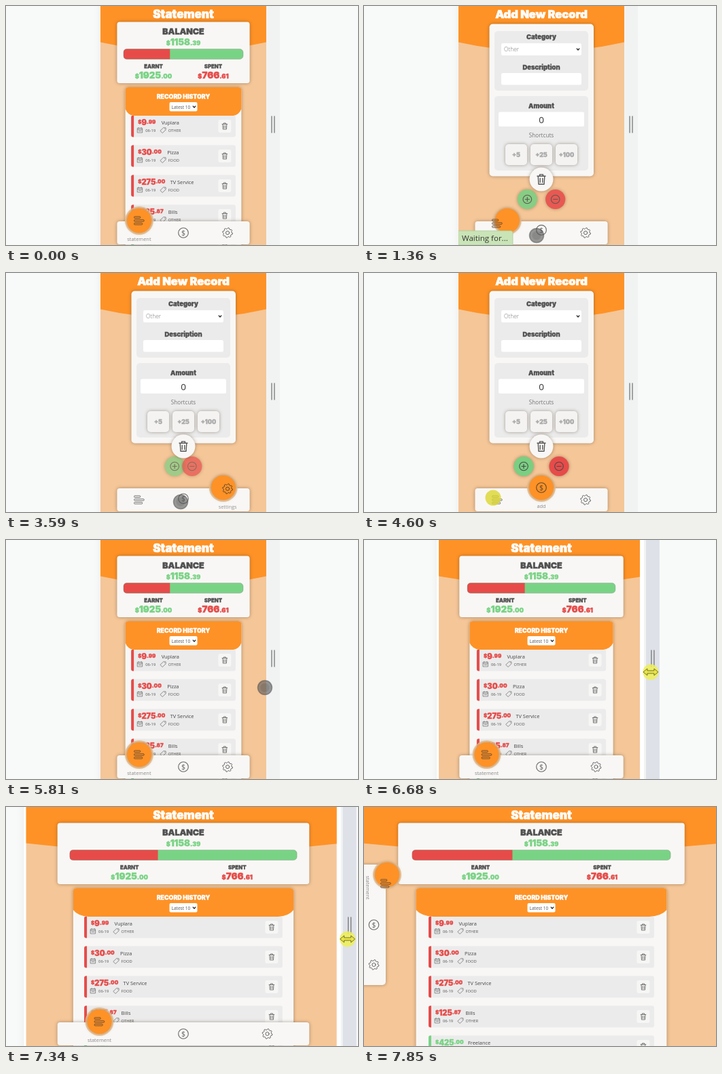
Write an HTML page that moves like this. It is 518 px wide and 353 px high and loops after 8000 ms.

```html
<!DOCTYPE html>
<html lang="en">
<head>
<meta charset="utf-8">
<title>Budget app</title>
<style>
  html, body { margin: 0; width: 100%; height: 100%; overflow: hidden; background: #f8faf9; }
  svg { display: block; width: 518px; height: 353px; }
  text { font-family: "Open Sans", "Noto Sans", sans-serif; text-anchor: middle; white-space: pre; }
  .h { font-family: Inter, Roboto, sans-serif; font-weight: 900; stroke-width: .04em; }
  .l { font-weight: 300; }
  .s { text-anchor: start; }
  .up { filter: drop-shadow(0 .5px 2.5px rgba(60, 40, 20, .42)); }
  .frame { filter: drop-shadow(0 0 6px rgba(0, 0, 0, .06)); }
  .line { fill: none; stroke-linecap: round; stroke-linejoin: round; }
</style>
</head>
<body>
<svg id="stage" viewBox="0 0 518 353"></svg>
<script>
const LOOP = 8000, START = 840, STEP = 171, MID = 261;
const ORANGE = '#fe9226', PEACH = '#f4c698', CARD = '#f8f7f5', PANEL = '#ebebeb';
const RED = '#e64b49', GREEN = '#79d385', DARK = '#505050';
const stage = document.getElementById('stage');

const clamp = v => Math.max(0, Math.min(1, v));
const mix = (a, b, p) => a + (b - a) * p;
const smooth = p => (p = clamp(p)) * p * (3 - 2 * p);

// Shape helpers
const rect = (x, y, w, h, fill, r = 0, more = '') =>
  `<rect x="${x}" y="${y}" width="${w}" height="${h}" rx="${r}" fill="${fill}" ${more}/>`;
const disc = (x, y, r, fill, more = '') =>
  `<circle cx="${x}" cy="${y}" r="${r}" fill="${fill}" ${more}/>`;
const shape = (d, fill) => `<path d="${d}" fill="${fill}"/>`;
const line = (d, color, w = 1) => `<path class="line" d="${d}" stroke="${color}" stroke-width="${w}"/>`;
const at = (x, y, body, k = 1) => `<g transform="translate(${x} ${y}) scale(${k})">${body}</g>`;
const text = (x, y, s, size, fill, cls = '') =>
  `<text x="${x}" y="${y}" font-size="${size}" fill="${fill}" class="${cls}">${s}</text>`;
const head = (x, y, s, size, fill) =>
  `<text class="h" x="${x}" y="${y}" font-size="${size}" fill="${fill}" stroke="${fill}">${s}</text>`;
const UP = 'class="up"';

function money(x, y, value, big, small, fill, cls = '', lift = 0) {
  const [whole, cents] = value.split('.');
  return `<text class="h ${cls}" x="${x}" y="${y}" font-size="${small}" fill="${fill}" stroke="${fill}">` +
    `<tspan dy="${-lift}">$</tspan><tspan dy="${lift}" font-size="${big}">${whole}</tspan>` +
    `<tspan dy="${-lift}">.${cents}</tspan></text>`;
}

// Icons, drawn around 0,0
const trash = c => line('M-4-3.2H4M-1.6-3.2V-4.8H1.6V-3.2M-3.2-3.2L-2.7 4.8H2.7L3.2-3.2M-1.2-1V3M1.2-1V3', c, .9);
const calendar = c => line('M-3.5-3H3.5V3.5H-3.5ZM-3.5-1H3.5M-2-4V-2.6M2-4V-2.6M-1.8 1H1.8', c, .8);
const tag = c => line('M-4 .6L.6-3.8L4-3.6L4-.6L-.6 3.8ZM2.2-2.2h.1', c, .8);
const camera = c => line('M-6-3H-3L-2-4.8H2L3-3H6V4.5H-6Z', c, 1) +
  `<circle class="line" cy=".6" r="2.4" stroke="${c}"/>`;
const exit = c => line('M1.5-2V-4.5H-4.5V4.5H1.5V2M-1 0H6M4-2L6 0L4 2', c, 1);
const chevron = (x, y) => line(`M${x - 1.8} ${y - 1}L${x} ${y + 1}L${x + 1.8} ${y - 1}`, '#222', 1.2);
const ring = (sign, c) => disc(0, 0, 6.3, 'none', `stroke="${c}" stroke-width="1.1"`) +
  line(sign === '+' ? 'M-3 0H3M0-3V3' : 'M-3 0H3', c, 1.2);

const bars = c => [[-4.8, 9], [0, 14.5], [4.8, 12]].map(([y, w]) =>
  rect(-7.3, y - 1.2, w, 2.4, 'none', .7, `stroke="${c}" stroke-width=".9"`)).join('');
const dollar = c => disc(0, 0, 7.3, 'none', `stroke="${c}" stroke-width="1.1"`) + text(0, 3.8, '$', 10.5, c);
function gear(c) {
  const pts = [];
  for (let i = 0; i < 32; i++) {
    const a = (i + .5) / 32 * Math.PI * 2, r = i % 4 < 2 ? 7.4 : 5.9;
    pts.push((r * Math.cos(a)).toFixed(2) + ' ' + (r * Math.sin(a)).toFixed(2));
  }
  return line(`M${pts.join('L')}Z`, c) + `<circle class="line" r="2.6" stroke="${c}"/>`;
}

const TABS = [['statement', bars], ['add', dollar], ['settings', gear]];
const RECORDS = [
  ['9.99', 'Vuplara', 'OTHER', 44.5], ['30.00', 'Pizza', 'FOOD', 53],
  ['275.00', 'TV Service', 'FOOD', 57.5], ['125.87', 'Bills', 'OTHER', 54.5],
  ['425.00', 'Freelance', 'OTHER', 58, GREEN]
];

function record([sum, name, kind, gap, color = RED], i, left, width) {
  const y = 161.5 + 44 * i, right = left + width;
  return rect(left, y, width, 32, PANEL, 3) +
    shape(`M${left + 4} ${y}h-1.5q-2.5 0-2.5 3v26q0 3 2.5 3h1.5z`, color) +
    money(left + 10, y + 14.3, sum, 11.2, 7.9, color, 's', 1.5) +
    text(left + gap, y + 13.5, name, 7.4, '#444', 's') +
    at(left + 13, y + 22, calendar('#777')) + text(left + 21, y + 24.5, '06-19', 5.8, '#555', 's') +
    at(left + 47, y + 22, tag('#777')) + text(left + 54.5, y + 24.5, kind, 5.8, '#555', 's') +
    rect(right - 25.5, y + 6.5, 19, 19, '#f6f6f5', 3) + at(right - 16, y + 16, trash('#666'), .95);
}

function statement(w) {
  const card = w * .8, bar = card * .902, log = w * .7, row = log * .9;
  const side = 44 + (w - 244) * .161, x = MID - log / 2, x2 = MID + log / 2, c = log * .07;
  return head(MID, 18, 'Statement', 17, '#fff') +
    rect(MID - card / 2, 23.5, card, 90.5, CARD, 4, UP) +
    head(MID, 42, 'BALANCE', 12.4, DARK) + money(MID, 58, '1158.39', 13.2, 9, GREEN) +
    rect(MID - bar / 2, 63.5, bar, 15, GREEN, 5) +
    shape(`M${MID - bar * .112} 63.5V78.5H${MID - bar / 2 + 5}q-5 0-5-5v-5q0-5 5-5z`, RED) +
    rect(MID - bar / 2, 63.5, bar, 15, 'none', 5, 'stroke="#777" stroke-width=".5" stroke-opacity=".6"') +
    head(MID - side, 92, 'EARNT', 7.8, DARK) + money(MID - side, 107, '1925.00', 13.4, 9.2, GREEN) +
    head(MID + side, 92, 'SPENT', 7.8, DARK) + money(MID + side, 107, '766.61', 13.4, 9.2, RED) +
    rect(x, 120, log, 260, CARD, 5, UP) +
    RECORDS.map((r, i) => record(r, i, MID - row / 2, row)).join('') +
    shape(`M${x} 125q0-5 5-5H${x2 - 5}q5 0 5 5V152Q${x2 - c * .3} 161 ${x2 - c} 162H${x + c}Q${x + c * .3} 161 ${x} 152z`, ORANGE) +
    head(MID, 136.7, 'RECORD HISTORY', 8.8, '#fff') +
    rect(240.5, 142, 41, 13.5, '#fff', 2) + text(243.5, 151.6, 'Latest 10', 6.6, '#555', 's') + chevron(277, 149);
}

function add(open) {
  const field = (x, y, w, h) => rect(x, y, w, h, '#fff', 2.5);
  const round = (x, fill, sign) =>
    `<g opacity="${.4 + .6 * open}">${disc(x, 285.5, 14.6, fill, UP)}${at(x, 285.5, ring(sign, '#4a4a4a'))}</g>`;
  return head(MID, 18, 'Add New Record', 16.5, '#fff') +
    rect(184.5, 26.5, 153.5, 225, CARD, 5, UP) +
    rect(192, 37, 138, 88, PANEL, 5) + rect(192, 133, 138, 110, PANEL, 5) +
    head(MID, 49, 'Category', 9.4, DARK) + field(202, 55, 118, 18) +
    text(206, 67, 'Other', 8.4, '#777', 'l s') + chevron(315, 64) +
    head(MID, 94, 'Description', 9.4, DARK) + field(202, 99, 118, 17.5) +
    head(MID, 151, 'Amount', 9.3, DARK) + field(198, 156.5, 126, 21.5) +
    text(MID, 173, '0', 13.5, '#333') + text(MID, 193.5, 'Shortcuts', 8.2, '#777') +
    ['+5', '+25', '+100'].map((s, i) => rect(208 + 37 * i, 204, 32, 31, '#f4f3f2', 5, UP) +
      head(224 + 37 * i, 223, s, 8.8, '#aaa')).join('') +
    round(MID - 26 * open, '#79cf82', '+') + round(MID + 26 * open, RED, '-') +
    disc(MID, 256, 17.5, CARD, UP) + at(MID, 256, trash('#555'), 1.5);
}

function avatar() {
  return `<clipPath id="face"><circle cx="261" cy="63" r="28"/></clipPath><g clip-path="url(#face)">` +
    rect(233, 35, 56, 56, '#e8e3cc') +
    line('M241 52V41L272 37L277 47', '#3c4a4e', 1.5) +
    shape('M241 53L253 48L279 47L281 68L252 74L242 68z', '#3d7c98') +
    shape('M241 53L253 48L279 47L254 52z', '#9cc4cf') + shape('M241 53L254 52V74L242 68z', '#27536a') +
    rect(256, 54, 9, 10, '#d8dccb', 1) + rect(268, 53, 8, 10, '#d8dccb', 1) +
    disc(260.5, 60, 2.2, '#c9503c') + disc(272, 59, 2.2, '#c9503c') +
    shape('M246 75L283 70V92H246z', '#5c9db5') + rect(255, 76, 20, 5, '#2a4a58') +
    shape('M238 72L246 75V92H238z', '#2f6178') + '</g>';
}

function settings() {
  return head(MID, 18, 'Settings', 17, '#fff') +
    rect(186, 26.5, 150, 172.5, CARD, 4, UP) + avatar() +
    disc(285, 82.5, 12, '#f6f5f4', UP) + at(285, 82.5, camera('#555')) +
    text(MID, 110, 'Your Screen Name', 7.6, '#999', 'l') +
    rect(211, 116, 100, 16, '#fefefe', 2.5) + text(MID, 128.3, 'Rilo', 11, '#666', 'l') +
    disc(MID, 162.5, 13, '#f8f7f6', UP) + at(MID, 162.5, exit('#666')) +
    text(MID, 186, 'LOGOUT', 5.9, '#555', 'l');
}

const ball = (x, y) => disc(x, y, 21, '#f3c391', 'opacity=".85"') + disc(x, y, 18, ORANGE, UP);
const tint = a => a > .5 ? '#5d4632' : '#666';

function bottomNav(w, nav) {
  const bar = w * .8, tabX = i => MID + (i - 1) * bar / 3;
  const active = i => i === nav.to ? nav.p : i === nav.from ? 1 - nav.p : 0;
  return rect(MID - bar / 2, 318, bar, 34, CARD, 4, UP) +
    ball(mix(tabX(nav.from), tabX(nav.to), nav.p), 317) +
    TABS.map(([name, icon], i) => {
      const a = active(i);
      return at(tabX(i), 335 - 18 * a, icon(tint(a))) +
        (a ? `<g opacity="${a}">${text(tabX(i), 346.5 + 14 * (1 - a), name, 7.4, '#8a8a8a')}</g>` : '');
    }).join('');
}

function sideNav(p) {
  return rect(-10, 85, 42, 178, CARD, 5, UP) + ball(mix(45, 34, p), mix(84, 100, p)) +
    at(32, 113, bars(tint(1))) + at(14.5, 174, dollar('#666')) + at(14.5, 233, gear('#666')) +
    `<g transform="translate(3 119) rotate(90)">${text(0, 0, 'statement', 7.4, '#8a8a8a')}</g>`;
}

// Tab changes: start time, from, to
const MOVES = [[1198, 0, 1], [2277, 1, 2], [3480, 2, 1], [4650, 1, 0]];
function navAt(t) {
  const move = MOVES.filter(m => t >= m[0]).pop();
  if (!move) return { from: 0, to: 0, p: 1, age: LOOP };
  const [start, from, to] = move;
  return { from, to, p: smooth((t - start) / 500), age: t - start };
}

const PATH = [[840, 262, 366], [1010, 254, 339], [2030, 254, 339], [2205, 323.5, 334], [3220, 323.5, 334],
  [3400, 257, 338], [4260, 257, 338], [4595, 190, 332], [4950, 190, 332], [5465, 363, 240],
  [5808, 381, 218], [6135, 393, 195], [LOOP, 393, 195]];
const CLICKS = [1180, 2208, 3405, 4602];

function cursor(t, x0) {
  if (t < START) return '';
  if (t >= 6100) {
    const arrow = 'M-11 0L-5-5V-2H5V-5L11 0L5 5V2H-5V5Z';
    return (t > 6470 ? disc(x0, 195, 11.5, '#eeee55', 'opacity=".85"') : '') +
      at(x0, 195, `<path d="${arrow}" fill="${t > 6470 ? '#e9e545' : '#fff'}" stroke="#66662e" stroke-width=".9"/>`);
  }
  const i = PATH.findIndex(k => k[0] > t), [ta, xa, ya] = PATH[i - 1], [tb, xb, yb] = PATH[i];
  const p = smooth((t - ta) / (tb - ta)), x = mix(xa, xb, p), y = mix(ya, yb, p);
  if (CLICKS.some(c => Math.abs(t - c) < 60)) return disc(x, y, 11.5, '#dcd62f', 'opacity=".8"');
  return disc(x, y, 10.5, '#555', 'fill-opacity=".6" stroke="#555" stroke-opacity=".55" stroke-width="1.5"') +
    disc(x, y, 6.5, '#444', 'opacity=".15"');
}

function draw(t) {
  const w = t < 6470 ? 244 : Math.min(527, 244 + .236 * (t - 6409));
  const left = MID - w / 2, right = MID + w / 2, drag = w > 244, wide = w >= 520;
  const nav = navAt(t), end = drag && !wide ? right - 6 : right, strip = right + (drag ? 3 : 0);
  const page = [() => statement(w), () => add(clamp(nav.age / 195)), settings][nav.to]();
  stage.innerHTML =
    rect(0, 0, 518, 353, '#f8faf9') +
    rect(left - (drag ? 3 : 0), -20, w + (drag ? 3 : 0), 400, '#fff', 0, 'class="frame"') +
    rect(strip, 0, 20, 353, t >= 6100 ? '#dee1e8' : '#f1f3f3') +
    line(`M${strip + 8} 163V187M${strip + 12} 163V187`, '#777', 1.3) +
    `<clipPath id="phone">${rect(left, 0, end - left, 353, '#000')}</clipPath><g clip-path="url(#phone)">` +
    rect(left, 0, w, 353, PEACH) +
    shape(`M${left} 0V53.5Q${MID} 81 ${right} 53.5V0z`, ORANGE) +
    page + (wide ? sideNav(clamp((t - 7680) / STEP)) : bottomNav(w, nav)) +
    (t > 1190 && t < 1600 ? `<path d="M139 353V332H216q3 0 3 3V353z" fill="#c9e4b6" stroke="#a9c596" stroke-width=".7"/>` +
      text(144, 347, 'Waiting for...', 11.5, '#333', 's') : '') +
    '</g>' + cursor(t, right + 10);
}

let shown = null;
const origin = performance.now();
function tick() {
  const t = (performance.now() - origin) % LOOP;
  const now = t < START - 4 ? 0 : START + STEP * Math.floor((t - START + 5) / STEP);
  if (now !== shown) draw(shown = now);
  requestAnimationFrame(tick);
}
tick();
</script>
</body>
</html>
```
